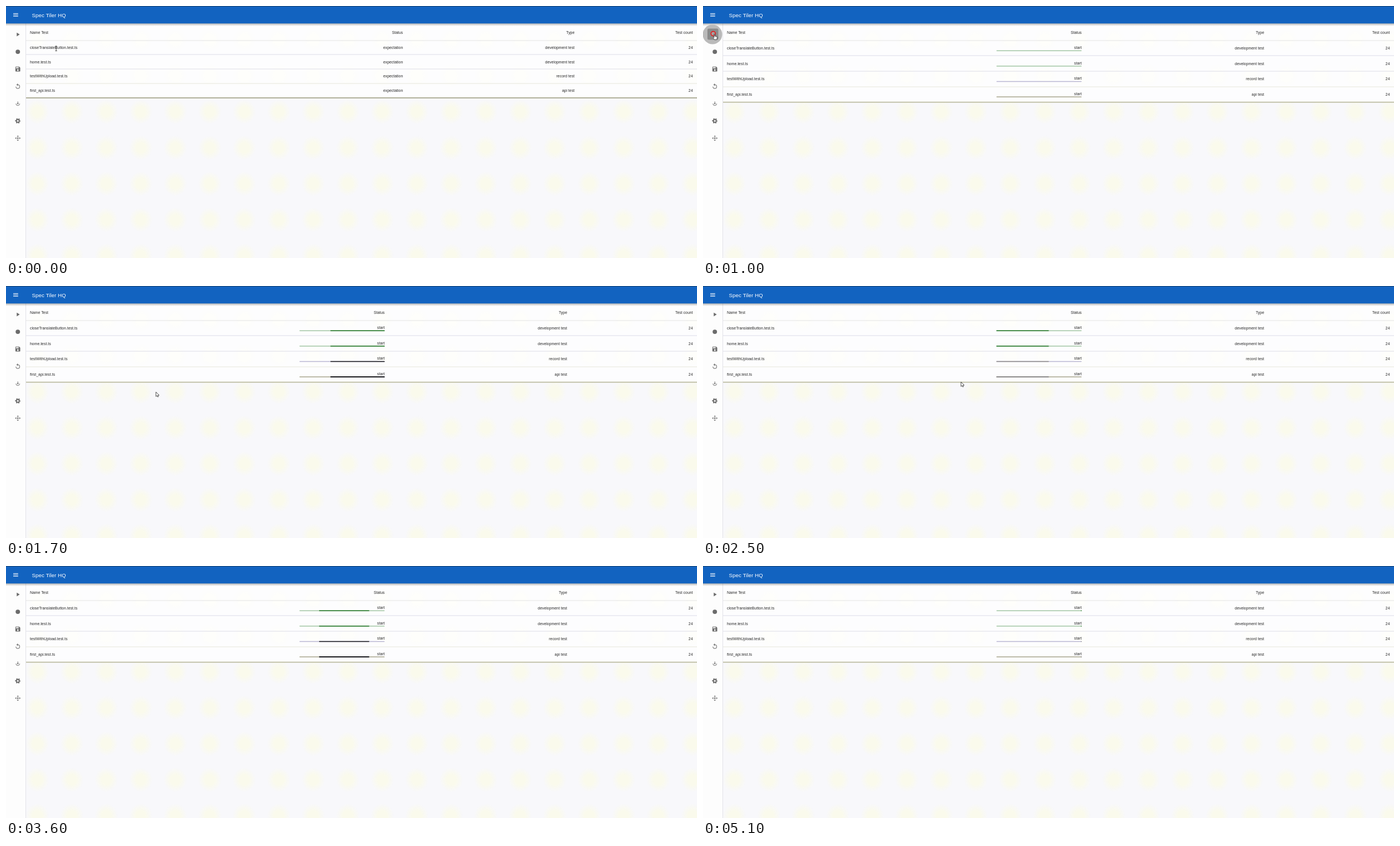
An HTML page that plays this animation: 1240 px wide and 452 px high, repeating every 5.2 s.

```html
<!DOCTYPE html>
<html lang="en">
<head>
<meta charset="utf-8">
<title>Spec Tiler HQ</title>
<style>
html, body { margin: 0; width: 100%; height: 100%; overflow: hidden; background: #f8f8fb; }
#stage { display: block; width: 1240px; height: 452px; }
text { font: 6.78px "Liberation Sans", Arial, sans-serif; letter-spacing: .0107em; fill: #242424; }
text.end { text-anchor: end; }
#title { font-size: 9.68px; letter-spacing: .0075em; fill: #fff; }
.icon { fill: #6c6c6c; stroke: none; }
.icon .line { fill: none; stroke: #6c6c6c; stroke-width: 2; }

/* Parts that exist only for a while: --at start, --for length */
.timed { visibility: hidden; animation: show var(--for) var(--at); }
.gap { animation: hide var(--for) var(--at); }
@keyframes show { from, to { visibility: visible; } }
@keyframes hide { from, to { visibility: hidden; } }

.first, .second { y: 0; height: 100%; x: -200%; width: 0; }
.first { animation: first 1260ms cubic-bezier(.65, .815, .735, .395) var(--at); }
.second { animation: second 1260ms cubic-bezier(.165, .84, .44, 1) var(--at); }
@keyframes first { from { x: -35%; width: 35%; } to { x: 100%; width: 90%; } }
@keyframes second { from { x: -200%; width: 200%; } to { x: 107%; width: 1%; } }

#ripple { animation: show 700ms 800ms, grow 200ms 750ms ease-out both; transform-origin: 17px 51px; }
@keyframes grow { from { transform: scale(.3); } to { transform: none; } }

#pointer { animation: roam 5200ms linear both; }
@keyframes roam {
  0% { transform: translate(90px, 76px); }
  7.69%, 25% { transform: translate(20.5px, 50px); }
  32.69% { transform: translate(269px, 190px); }
  36.54% { transform: translate(309px, 229px); }
  40.38% { transform: translate(352px, 248px); }
  44.23% { transform: translate(415px, 222px); }
  48.08% { transform: translate(463px, 172px); }
  59.62% { transform: translate(496px, 43px); }
  61.54%, 100% { transform: translate(500px, 10px); }
}
</style>
</head>
<body>
<svg id="stage" viewBox="0 0 1240 452">
  <defs>
    <radialGradient id="glow">
      <stop offset=".4" stop-color="#fafaec"/>
      <stop offset="1" stop-color="#fafaec" stop-opacity="0"/>
    </radialGradient>
    <pattern id="spots" x="25.2" y="157.7" width="61.9" height="64.6" patternUnits="userSpaceOnUse">
      <rect x="10" y="10" width="42" height="44" rx="9" fill="url(#glow)"/>
    </pattern>
    <linearGradient id="shade" x2="0" y2="1">
      <stop stop-opacity=".3"/>
      <stop offset="1" stop-opacity="0"/>
    </linearGradient>
    <path id="chevron" d="M15.54 5.54 13.77 7.3 12 5.54 10.23 7.3 8.46 5.54 12 2z"/>
  </defs>

  <rect width="1240" height="452" fill="#f8f8fb"/>
  <rect width="1240" height="452" fill="url(#spots)"/>
  <g id="tables"></g>

  <rect width="35" height="452" fill="#fdfdfd"/>
  <rect x="35" width="1" height="452" fill="#e3e3e8"/>
  <rect y="31" width="1240" height="5" fill="url(#shade)"/>
  <rect width="1240" height="31.3" fill="#1263c0"/>
  <rect width="1240" height="1" fill="#123f70"/>
  <path transform="translate(11.6 10.2) scale(.484)" fill="#fff" d="M3 18h18v-2H3zm0-5h18v-2H3zm0-7v2h18V6z"/>
  <text id="title" x="46.5" y="19.5">Spec Tiler HQ</text>

  <circle class="timed" style="--at:400ms;--for:1100ms" cx="17" cy="51" r="16" fill="#f1f1f1"/>
  <circle id="ripple" class="timed" cx="17" cy="51" r="17.5" fill="#bababa"/>
  <g id="icons"></g>
  <g class="timed" style="--at:1000ms;--for:500ms">
    <rect x="8" y="40.5" width="19.5" height="20" rx="2.5" fill="#8b8b8b"/>
    <circle cx="18.3" cy="49.6" r="4" fill="#a9a3a3" stroke="#e51c1c" stroke-width="1.7"/>
  </g>

  <g id="pointer" fill="#fff" stroke="#222" stroke-width=".8" stroke-linejoin="round">
    <path class="timed" style="--at:0ms;--for:100ms" fill="none" d="M-1.6-4H1.6M0-4V4.5M-1.6 4.5H1.6"/>
    <path class="timed" style="--at:100ms;--for:200ms" d="M0 0V8.2L1.9 6.5 3.1 9 4.4 8.4 3.3 6H5.8z"/>
    <path class="timed" style="--at:300ms;--for:1200ms" d="M-.8 .6Q0-.5 .8 .6V4L4 4.8Q5 5 5 6.2L4.2 10.5H0L-2.6 6.8Q-2.6 5.6-1.6 6L-.8 6.7z"/>
    <path class="timed" style="--at:1500ms;--for:1800ms" d="M0 0V8.2L1.9 6.5 3.1 9 4.4 8.4 3.3 6H5.8z"/>
  </g>
</svg>

<script>
const LOOP = 5200, TICK = 100;
const byId = id => document.getElementById(id);

const tests = [
  ["closeTranslateButton.test.ts", "development test"],
  ["home.test.ts", "development test"],
  ["testWithUpload.test.ts", "record test"],
  ["first_api.test.ts", "api test"]
];
// Track, first runner, second runner
const tones = [
  ["#a9caab", "#2e7d32", "#2e7d32"],
  ["#a9caab", "#2e7d32", "#2e7d32"],
  ["#b9b6d3", "#17171b", "#8a8888"],
  ["#bcbaa8", "#17171b", "#8a8888"]
];
const dividers = ["#e4e4e4", "#dcdcea", "#dedee8", "#e8e8dc"];

const label = (x, y, text, cls = "end") => `<text class="${cls}" x="${x}" y="${y}">${text}</text>`;

function runner(kind, color, starts) {
  return starts.map(at => `<rect class="${kind}" style="--at:${at}ms" fill="${color}"/>`).join("");
}

function progress(y, [track, one, two]) {
  return `<svg x="526.5" y="${y}" width="153" height="2">
    <rect width="100%" height="100%" fill="${track}"/>
    ${runner("first", one, [1000, 3080])}${runner("second", two, [2281, 4235])}</svg>`;
}

function table({ at, length, pitch, status, type, running, edge }) {
  const top = 61.8, bottom = top + 4 * pitch;
  let out = `<rect x="35" y="31" width="1205" height="${bottom - 31}" fill="#fff" opacity=".78"/>`;
  out += label(43, 50.4, "Name Test", "") + label(status, 50.4, "Status") +
    label(type, 50.4, "Type") + label(1232.5, 50.4, "Test count");
  tests.forEach(([name, kind], i) => {
    const y = top + i * pitch, base = y + pitch / 2 + 2.4;
    out += `<rect x="36" y="${Math.round(y) - .5}" width="1204" height="1" fill="${dividers[i]}"/>`;
    out += label(43, base, name, "") + label(type, base, kind) + label(1232.5, base, 24);
    out += running
      ? label(status, base - 1, "start") + progress(y + 17.4, tones[i])
      : label(status, base, "expectation");
  });
  out += `<rect x="36" y="${bottom - .5}" width="1204" height="1.7" fill="${edge}"/>`;
  return `<g class="timed" style="--at:${at}ms;--for:${length}ms">${out}</g>`;
}

byId("tables").innerHTML =
  table({ at: 0, length: 1000, pitch: 25.65, status: 712.3, type: 1020.3, edge: "#a3a388" }) +
  table({ at: 1000, length: 4200, pitch: 27.6, status: 679.5, type: 1007, running: true, edge: "#b9b99c" });

const turns = [0, 90, 180, 270].map(a => `<use href="#chevron" transform="rotate(${a} 12 12)"/>`).join("");
const icons = [
  `<path class="gap" style="--at:1000ms;--for:500ms" d="M8 5v14l11-7z"/>`,
  `<circle cx="12" cy="12" r="8.2"/>`,
  `<path fill-rule="evenodd" d="M17 3H5a2 2 0 0 0-2 2v14a2 2 0 0 0 2 2h14a2 2 0 0 0 2-2V7zM12 19a3 3 0 1 1 0-6 3 3 0 0 1 0 6zM15 9H5V5h10z"/>`,
  `<path d="M12 5V1L7 6l5 5V7a6 6 0 1 1-6 6H4a8 8 0 1 0 8-8z"/>`,
  `<path d="M11 4h2v6h3l-4 5-4-5h3z"/><path class="line" d="M5 12a7 7 0 0 0 14 0"/>`,
  `<circle class="line" cx="12" cy="12" r="5.4" style="stroke-width:4"/>
   <circle class="line" cx="12" cy="12" r="8.2" pathLength="12" stroke-dasharray="1 1" stroke-dashoffset=".5" style="stroke-width:3.6"/>`,
  `<circle cx="12" cy="12" r="3"/>${turns}`
];
byId("icons").innerHTML = icons.map((shape, i) =>
  `<g class="icon" transform="translate(15.4 ${45.3 + i * 31}) scale(.484)">${shape}</g>`).join("");

const motions = document.getAnimations();
motions.forEach(m => m.pause());
const began = performance.now();
let shown = -1;
function draw() {
  const t = Math.floor((performance.now() - began) % LOOP / TICK) * TICK;
  if (t !== shown) motions.forEach(m => { m.currentTime = t; });
  shown = t;
  requestAnimationFrame(draw);
}
draw();
</script>
</body>
</html>
```
